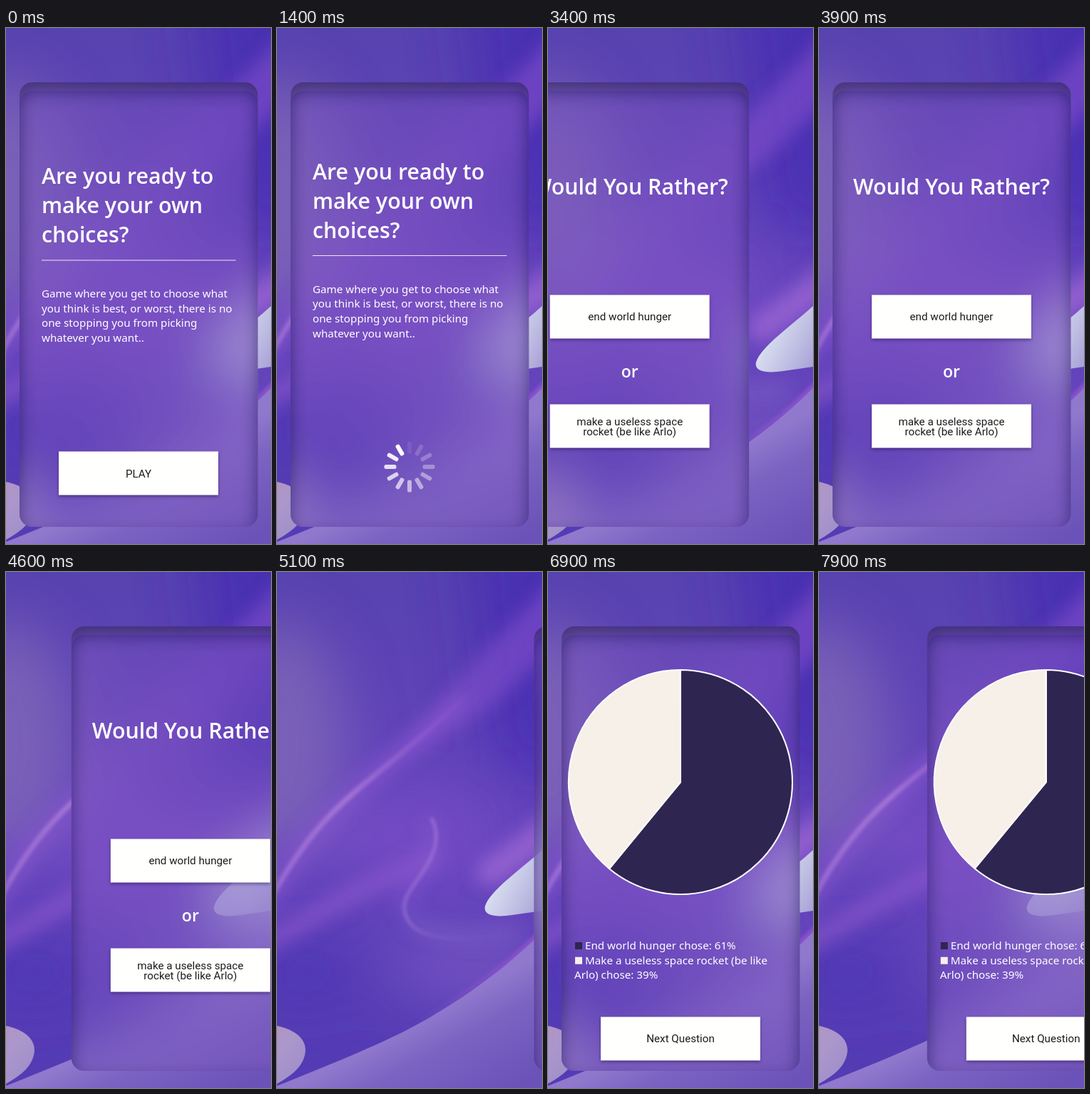
An HTML page that plays this animation: 372 by 722 pixels, repeating every 8000 ms.

```html
<!DOCTYPE html>
<html lang="en">
<head>
<meta charset="utf-8">
<title>Would You Rather?</title>
<style>
  html, body { margin: 0; width: 100%; height: 100%; overflow: hidden; background: #5a42b4; }
  svg { display: block; width: 100vw; height: 100vh; }
  text { fill: #fff; font-family: "Noto Sans", sans-serif; font-size: 15.2px; white-space: pre; }
  .title, .or { font-family: "Open Sans", sans-serif; font-weight: 600; }
  .title { font-size: 30.4px; }
  .or { font-size: 23px; }
  .btn rect { fill: #fffffd; filter: drop-shadow(0 2px 2px rgba(25, 10, 60, .48)); }
  .btn text { fill: #1c1c1e; font-family: Roboto, sans-serif; }
  .mid { text-anchor: middle; }
</style>
</head>
<body>
<svg viewBox="0 0 372 722">
  <defs>
    <filter id="b2" x="-100" y="-100" width="572" height="922" filterUnits="userSpaceOnUse"><feGaussianBlur stdDeviation="2.5"/></filter>
    <filter id="b12" x="-100" y="-100" width="572" height="922" filterUnits="userSpaceOnUse"><feGaussianBlur stdDeviation="12"/></filter>
    <filter id="b40" x="-150" y="-150" width="672" height="1022" filterUnits="userSpaceOnUse"><feGaussianBlur stdDeviation="40"/></filter>
    <linearGradient id="base" x1="0" y1="0" x2="0" y2="1">
      <stop offset="0" stop-color="#5143aa"/>
      <stop offset=".3" stop-color="#5e43b6"/>
      <stop offset=".52" stop-color="#6845bf"/>
      <stop offset=".74" stop-color="#573db6"/>
      <stop offset="1" stop-color="#4f3ab2"/>
    </linearGradient>
    <linearGradient id="wingFill" gradientUnits="userSpaceOnUse" x1="305" y1="440" x2="385" y2="482">
      <stop offset="0" stop-color="#d8def0"/>
      <stop offset=".45" stop-color="#bfbfe3"/>
      <stop offset="1" stop-color="#a193d2"/>
    </linearGradient>
    <linearGradient id="waveFill" gradientUnits="userSpaceOnUse" x1="190" y1="630" x2="260" y2="760">
      <stop offset="0" stop-color="#9079cd"/>
      <stop offset=".35" stop-color="#7b63c2"/>
      <stop offset="1" stop-color="#6b52b8"/>
    </linearGradient>
    <linearGradient id="blobFill" x1="0" y1="0" x2=".8" y2="1">
      <stop offset="0" stop-color="#b892b8"/>
      <stop offset=".5" stop-color="#ab97cb"/>
      <stop offset="1" stop-color="#9a8aca"/>
    </linearGradient>
    <linearGradient id="streak" gradientUnits="userSpaceOnUse" x1="0" y1="450" x2="290" y2="152">
      <stop offset="0" stop-color="#a878da" stop-opacity=".7"/>
      <stop offset=".4" stop-color="#b582dc" stop-opacity=".75"/>
      <stop offset="1" stop-color="#9058d2" stop-opacity="0"/>
    </linearGradient>
    <linearGradient id="curl" gradientUnits="userSpaceOnUse" x1="200" y1="340" x2="300" y2="515">
      <stop offset="0" stop-color="#b083e0" stop-opacity=".8"/>
      <stop offset=".6" stop-color="#a67cdc" stop-opacity=".7"/>
      <stop offset="1" stop-color="#8a66cc" stop-opacity="0"/>
    </linearGradient>
    <linearGradient id="rim" gradientUnits="userSpaceOnUse" x1="190" y1="630" x2="372" y2="504">
      <stop offset="0" stop-color="#8a50cc" stop-opacity="0"/>
      <stop offset="1" stop-color="#9a58d4" stop-opacity=".8"/>
    </linearGradient>
    <path id="wing" d="M372 389C345 414 298 446 292 468C289 482 310 483 330 480L372 474H480V300Z" fill="url(#wingFill)"/>
    <clipPath id="cardClip"><rect id="clipBox" x="19" y="76" width="334.5" height="622" rx="18"/></clipPath>
  </defs>

  <g id="bg">
    <rect x="-150" y="-150" width="672" height="1022" fill="url(#base)"/>
    <g filter="url(#b40)">
      <ellipse cx="0" cy="235" rx="95" ry="165" fill="#8068b8" opacity=".8"/>
      <path d="M255 -100L480 -150V330L300 270Z" fill="#4428b2" opacity=".7"/>
      <ellipse cx="190" cy="370" rx="110" ry="60" fill="#7c4fc8" opacity=".65"/>
      <ellipse cx="275" cy="550" rx="120" ry="55" fill="#7252c0" opacity=".95"/>
      <ellipse cx="40" cy="560" rx="80" ry="45" fill="#4a34b2" opacity=".7"/>
    </g>
    <g fill="none" stroke-linecap="round" filter="url(#b12)">
      <path d="M130 295L290 112L410 -10V85L305 185Z" fill="#8450cc" opacity=".6"/>
      <path d="M-20 470C60 330 150 280 250 185" stroke="#8a58d0" stroke-width="26" opacity=".6"/>
      <path d="M-20 520C70 475 110 440 220 400" stroke="#8c58cc" stroke-width="26" opacity=".7"/>
      <path d="M300 420Q340 395 400 345" stroke="#a36cd6" stroke-width="40" opacity=".7"/>
      <path d="M215 350C228 395 185 435 178 470" stroke="#8a58d0" stroke-width="18" opacity=".5"/>
      <path d="M190 490Q240 520 330 505" stroke="#8062c8" stroke-width="18" opacity=".5"/>
    </g>
    <g fill="none" stroke-linecap="round" filter="url(#b2)">
      <path d="M-10 460C40 365 90 322 140 282S220 215 290 152" stroke="url(#streak)" stroke-width="7"/>
      <path d="M217 345C232 372 219 400 201 425S170 466 185 489S240 514 300 515" stroke="url(#curl)" stroke-width="3.5"/>
      <path d="M190 636Q320 560 380 495" stroke="url(#rim)" stroke-width="9"/>
    </g>
    <path d="M-40 736L0 719C90 683 160 655 215 623S325 551 372 504L520 380V872H-40Z" fill="url(#waveFill)"/>
    <path d="M-40 630L0 635C24 640 40 652 40 669C39 690 22 704 0 716L-40 740Z" fill="url(#blobFill)"/>
    <use href="#wing"/>
  </g>

  <g clip-path="url(#cardClip)">
    <use href="#bg" filter="url(#b40)"/>
    <rect width="372" height="722" fill="#8058c0" opacity=".34"/>
    <use id="ghost" href="#wing"/>
    <path id="inset" fill="#1c1438" fill-opacity=".5" fill-rule="evenodd" filter="url(#b12)"
      d="M-60 0H432V780H-60ZM37 88H335.5A18 18 0 0 1 353.5 106V692A18 18 0 0 1 335.5 710H37A18 18 0 0 1 19 692V106A18 18 0 0 1 37 88Z"/>
  </g>

  <g id="intro"></g>
  <g id="question"></g>
  <g id="result"></g>
</svg>
<script>
const LOOP = 8000, W = 372, SLIDE = 1000;
const LOAD_AT = 1400, PIE_AT = 6050, SHARE = 0.61;
const $ = id => document.getElementById(id);

const lines = (x, y, step, cls, rows) =>
  rows.map((s, i) => `<text x="${x}" y="${y + i * step}" class="${cls}">${s}</text>`).join('');
const button = (y, base, rows) =>
  `<g class="btn"><rect x="74" y="${y}" width="224" height="61"/>${lines(186, base, 14.4, 'mid', rows)}</g>`;

let spokes = '';
for (let k = 0; k < 12; k++)
  spokes += `<rect x="-3" y="-35.5" width="6" height="17" rx="2.5" fill="#fff" transform="rotate(${k * 30})"/>`;

$('intro').innerHTML = `<g id="copy">
  ${lines(50, 218, 41, 'title', ['Are you ready to', 'make your own', 'choices?'])}
  <rect x="50" y="324.5" width="272.5" height="1" fill="#fff" opacity=".85"/>
  ${lines(50, 377, 20.7, '', ['Game where you get to choose what',
    'you think is best, or worst, there is no',
    'one stopping you from picking', 'whatever you want..'])}</g>
  <g id="play">${button(592.5, 628.5, ['PLAY'])}</g>
  <g id="spinner" transform="translate(186 614)">${spokes}</g>`;

$('question').innerHTML =
  lines(186, 233, 0, 'title mid', ['Would You Rather?']) +
  button(373.5, 409, ['end world hunger']) +
  lines(186, 489, 0, 'or mid', ['or']) +
  button(526.5, 555.5, ['make a useless space', 'rocket (be like Arlo)']);

$('result').innerHTML = `
  <g stroke="#fff" stroke-width="2" stroke-linejoin="round">
    <path id="sliceA" fill="#2e2650"/><path id="sliceB" fill="#f6f0e9"/></g>
  <rect x="38" y="518" width="10" height="10" fill="#2e2650"/>
  <rect x="38" y="538.7" width="10" height="10" fill="#f6f0e9"/>
  ${lines(52, 528, 20.7, '', ['End world hunger chose: 61%', 'Make a useless space rocket (be like'])}
  ${lines(37, 569.4, 0, '', ['Arlo) chose: 39%'])}
  ${button(622.5, 658, ['Next Question'])}`;

const cards = [
  { el: $('intro'), enter: -2000, leave: 1860 },
  { el: $('question'), enter: 2895, leave: 4446 },
  { el: $('result'), enter: 5677, leave: 7674 }
];
const spokeEls = [...$('spinner').children];

// cubic-bezier(.25, .1, .25, 1)
function ease(x) {
  if (x <= 0) return 0;
  if (x >= 1) return 1;
  const bez = (a, b, u) => 3 * a * u * (1 - u) ** 2 + 3 * b * u * u * (1 - u) + u ** 3;
  let lo = 0, hi = 1;
  for (let i = 0; i < 24; i++) {
    const u = (lo + hi) / 2;
    if (bez(.25, .25, u) < x) lo = u; else hi = u;
  }
  return bez(.1, 1, lo);
}

function slice(from, to) {
  const pt = f => {
    const a = f * 2 * Math.PI;
    return `${186 + 157 * Math.sin(a)} ${294 - 157 * Math.cos(a)}`;
  };
  return `M186 294L${pt(from)}A157 157 0 ${to - from > .5 ? 1 : 0} 1 ${pt(to)}Z`;
}

function draw(t) {
  let shift = -2 * W, fade = 0;
  for (const c of cards) {
    const out = ease((t - c.leave) / SLIDE);
    const dx = t < c.leave ? -W * (1 - ease((t - c.enter) / SLIDE)) : W * out;
    const on = Math.abs(dx) < W;
    c.el.style.display = on ? '' : 'none';
    if (!on) continue;
    c.el.setAttribute('transform', `translate(${dx} 0)`);
    shift = dx;
    fade = Math.min(1, out * 8) * .3;
  }
  $('clipBox').setAttribute('x', 19 + shift);
  $('inset').setAttribute('transform', `translate(${shift} 0)`);
  $('ghost').setAttribute('opacity', fade);

  const loading = t >= LOAD_AT;
  $('copy').setAttribute('transform', `translate(0 ${loading ? -6.5 : 0})`);
  $('play').style.display = loading ? 'none' : '';
  $('spinner').style.display = loading ? '' : 'none';
  if (loading) spokeEls.forEach((s, k) =>
    s.setAttribute('opacity', 1 - ((11 - k) / 12 + (t - LOAD_AT) / 1000) % 1));

  const p = Math.min(1, Math.max(0, (t - PIE_AT) / 1000));
  const grown = 1 - (1 - p) ** 4;
  $('sliceA').setAttribute('d', p ? slice(0, SHARE * grown) : '');
  $('sliceB').setAttribute('d', p ? slice(SHARE * grown, grown) : '');
}

const start = performance.now();
function tick() {
  draw((performance.now() - start) % LOOP);
  requestAnimationFrame(tick);
}
tick();
</script>
</body>
</html>
```
